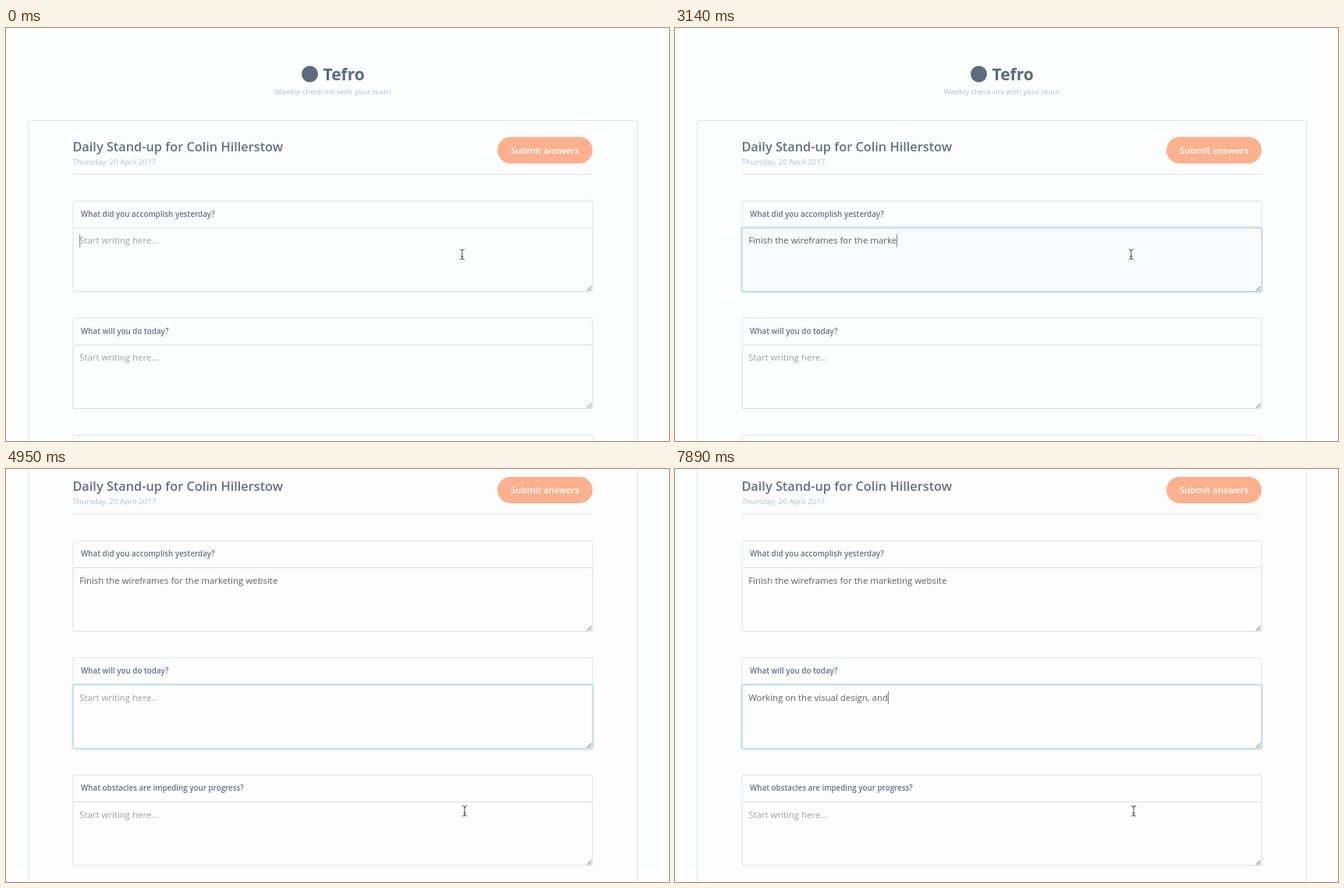
These frames come from a looping animation (850x529 px, 8000 ms). An HTML page:

```html
<!DOCTYPE html>
<html lang="en">
<head>
<meta charset="utf-8">
<title>Stand-up form</title>
<style>
  html, body { margin: 0; width: 100%; height: 100%; overflow: hidden; background: #fcfefd; }
  svg { display: block; width: 850px; height: 529px; }
  text { font-family: "Open Sans", sans-serif; white-space: pre; }
  .small { font-size: 9.8px; fill: #b1bed2; }
  .title { font-size: 16.32px; font-weight: 600; fill: #647084; }
  .label { font-size: 9.8px; font-weight: 600; fill: #647084; }
  .answer { font-size: 11.43px; }
  .line { fill: none; stroke: #dfe3e6; }
  .ring { fill: none; stroke: #b9d9f0; stroke-width: 4; opacity: .5; }
  .grip { fill: none; stroke: #606060; }
</style>
</head>
<body>
<svg viewBox="0 0 850 529">
  <rect id="panel" x="28" width="782" height="529" fill="#fdfdfd"/>
  <g id="page">
    <circle cx="389.5" cy="59" r="10.5" fill="#5f6a7c"/>
    <text x="406.5" y="67" font-size="21" font-weight="700" fill="#5f6a7c">Tefro</text>
    <text class="small" x="344.5" y="85">Weekly check-ins with your team</text>
    <rect class="line" x="28.5" y="118.5" width="781" height="700" rx="2"/>
    <text class="title" x="85.4" y="157.7">Daily Stand-up for Colin Hillerstow</text>
    <text class="small" x="85.5" y="174.5">Thursday, 20 April 2017</text>
    <rect x="630" y="139.5" width="122" height="34" rx="17" fill="#fbb08e"/>
    <text x="647" y="160.5" font-size="11.43" font-weight="600" fill="#fff">Submit answers</text>
    <path class="line" d="M86 187.5H752"/>
    <g id="blocks"></g>
    <rect id="caret" width="1" height="16.4" fill="#808080"/>
  </g>
  <path id="beam" d="M-3-6.5Q0-6.5 0-4.5Q0-6.5 3-6.5M0-5V5M-3 6.5Q0 6.5 0 4.5Q0 6.5 3 6.5M-1.5 2.5H1.5" fill="none" stroke="#484848"/>
  <path id="arrow" d="M0 0V11L2.5 8.7L4.2 12.5L6 11.7L4.4 8H7.8Z" fill="#111" stroke="#fff" stroke-width=".8"/>
</svg>
<script>
const LOOP = 8000, TICK = 70, TEXT_X = 94.2, BLOCK_GAP = 150;
const FOCUS = 70, MOVE = 4230, BLUR = 4650, SCROLL = 4710, REFOCUS = 4790, SCROLL_BY = 129.6;
const HINT = "Start writing here...";
const $ = id => document.getElementById(id);

// Each field: milliseconds per key, when its caret begins to blink, and bursts of keys
const fields = [
  {
    question: "What did you accomplish yesterday?",
    pace: 56, blinkFrom: 70,
    bursts: [[1030, "Finish the wireframes "], [2440, "for the marke"], [3290, "t"], [3510, "ing we"], [3870, "bsite"]]
  },
  {
    question: "What will you do today?",
    pace: 47, blinkFrom: 5100,
    bursts: [[5690, "W"], [5830, "orkingo"], [6330, "\b o"], [6620, "n the visual desi"], [7460, "gn"], [7680, ", and "]]
  },
  { question: "What obstacles are impeding your progress?", bursts: [] }
];

$("blocks").innerHTML = fields.map(({ question }, i) => `
  <g transform="translate(0 ${i * BLOCK_GAP})">
    <path class="line" d="M86 255.5V223.5Q86 221.5 88 221.5H750Q752 221.5 752 223.5V255.5"/>
    <text class="label" x="96" y="242">${question}</text>
    <rect class="ring" x="86" y="256" width="666" height="81.5" rx="2"/>
    <rect class="field" x="86" y="256" width="666" height="81.5" rx="2"/>
    <text class="answer" x="${TEXT_X}" y="276.2"></text>
    <path class="grip" d="M744.8 336.5L750.6 331M748.3 336.5L750.6 334.3"/>
  </g>`).join("");

const blocks = [...$("blocks").children].map(block => ({
  ring: block.querySelector(".ring"),
  box: block.querySelector(".field"),
  answer: block.querySelector(".answer")
}));

const measure = document.createElement("canvas").getContext("2d");
measure.font = '11.43px "Open Sans", sans-serif';

// Progress from 0 to 1 in a number of equal held steps
const stepped = (t, start, step, count) =>
  Math.min(1, Math.max(0, Math.floor((t - start) / step) / count));
const smooth = p => p * p * (3 - 2 * p);
const easeOut = p => 1 - (1 - p) ** 2.15;

function typedAt({ pace, bursts }, t) {
  let keys = "";
  for (const [start, text] of bursts) {
    if (t < start) break;
    const held = Math.floor((t - start) / TICK) * TICK;
    keys += text.slice(0, 1 + Math.round(held / pace));
  }
  return keys.replace(/.[\b]/g, "");
}

function show(element, visible) {
  element.setAttribute("visibility", visible ? "visible" : "hidden");
}

function drawBlocks(t, focus) {
  const base = t < REFOCUS ? "#fcfefd" : "#fdfdfd";
  blocks.forEach(({ ring, box, answer }, i) => {
    const focused = i === focus;
    const typed = typedAt(fields[i], t);
    show(ring, focused);
    box.setAttribute("fill", focused && i === 0 ? "#f9fafc" : base);
    box.setAttribute("stroke", focused ? "#add0e9" : "#d9dde0");
    answer.textContent = typed || HINT;
    answer.setAttribute("fill", typed ? "#5f5f5f" : "#a0a0a0");
  });
}

function drawCaret(t) {
  const active = t < BLUR ? 0 : 1;
  const field = fields[active];
  const typed = typedAt(field, t);
  const blinkOn = Math.floor(Math.max(0, t - field.blinkFrom) / 220) % 2 === 0;
  const away = t >= MOVE + TICK && t < 5020;
  $("caret").setAttribute("x", TEXT_X + measure.measureText(typed).width);
  $("caret").setAttribute("y", 264.2 + active * BLOCK_GAP);
  show($("caret"), !away && (typed || blinkOn));
}

function drawPointer(t) {
  const p = easeOut(stepped(t, MOVE, TICK, 6));
  const y = 290 + 148 * p;
  const overGap = y > 337 && y < 406;
  for (const id of ["beam", "arrow"]) {
    $(id).setAttribute("transform", `translate(${p ? 588 : 584.8} ${y})`);
    show($(id), (id === "arrow") === overGap);
  }
}

function draw(t) {
  const scroll = SCROLL_BY * smooth(stepped(t, SCROLL, 80, 3));
  const focus = t >= REFOCUS ? 1 : t >= FOCUS && t < BLUR ? 0 : -1;
  $("page").setAttribute("transform", `translate(0 ${-scroll})`);
  show($("panel"), t >= REFOCUS);
  drawBlocks(t, focus);
  drawCaret(t);
  drawPointer(t);
}

const began = performance.now();
function tick() {
  draw((performance.now() - began) % LOOP);
  requestAnimationFrame(tick);
}
tick();
</script>
</body>
</html>
```
